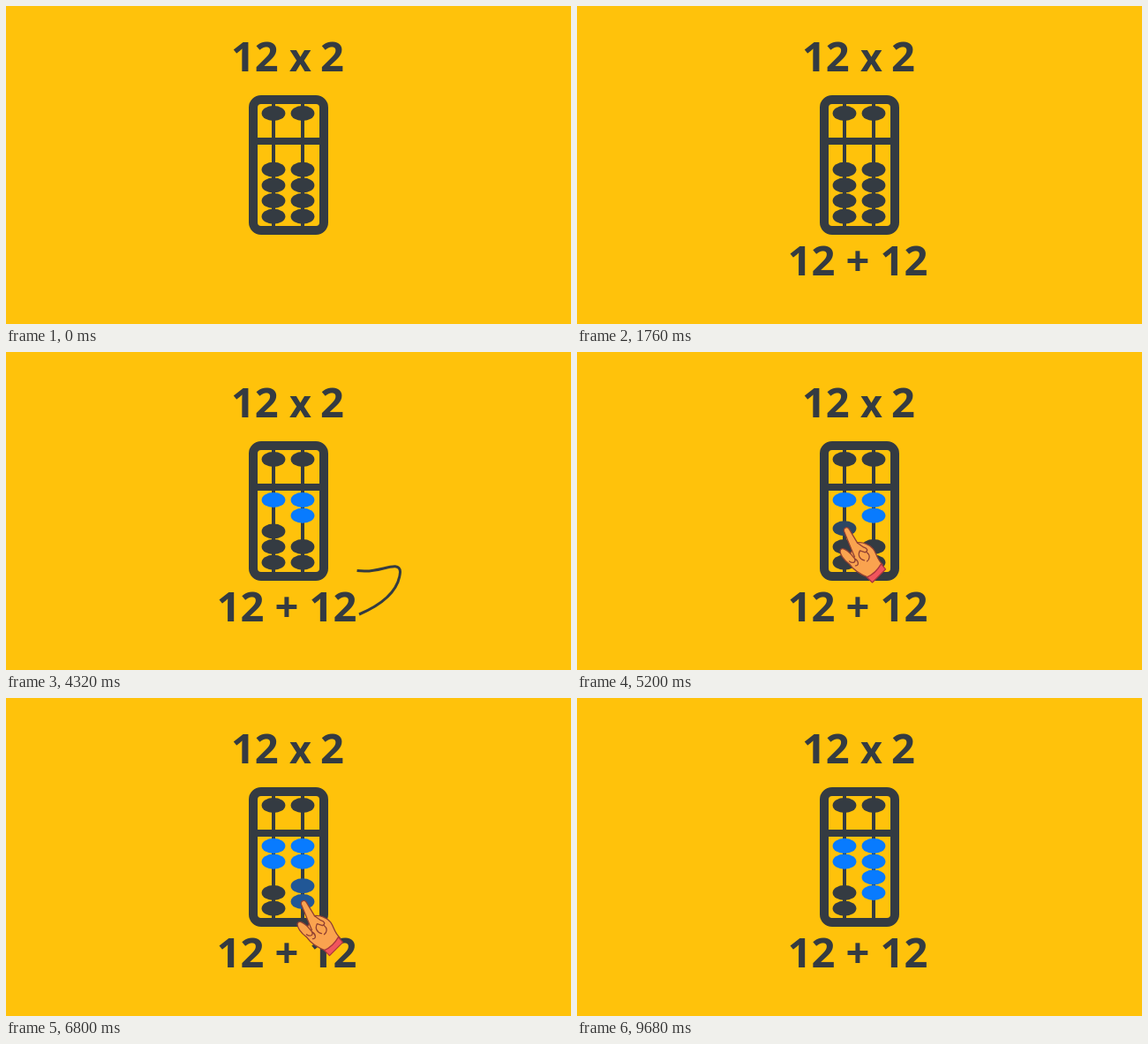
Write an HTML page that moves like this. It is 640 by 360 pixels and loops after 9.76 s.

```html
<!DOCTYPE html>
<html lang="en">
<head>
<meta charset="utf-8">
<title>12 x 2 on an abacus</title>
<style>
  html, body { margin: 0; width: 100%; height: 100%; overflow: hidden; background: #ffc20b; }
  svg { display: block; width: 640px; height: 360px; }
  text { font: bold 47px "Open Sans", "Noto Sans", sans-serif; fill: #343b42; }
  .frame, .trail { fill: none; stroke: #343b42; }
  .trail { stroke-width: 3; }
</style>
</head>
<body>
<svg viewBox="0 0 640 360">
  <defs>
    <g id="hand" stroke="#8f3f32" stroke-width="1.3" stroke-linejoin="round" stroke-linecap="round">
      <path fill="#faa34f" d="M-1 3C-2-1 3-3 5 1L14 16C20 15 28 18 32 23C36 28 36 35 43 41L28 56C20 53 11 49 5 40C-1 36-7 28-5 24C-3 21 2 24 6 28L8 25Z"/>
      <path fill="none" d="M8 25L11 32M14 16L21 21C25 22 27 25 23 27L17 25C14 30 17 35 22 36M6 28L11 34C13 38 9 40 5 37M11 34C16 37 16 42 12 42M25 27C29 30 28 35 25 37"/>
      <path fill="#f1555d" stroke="#a9363d" d="M41 40L46 46L31 61L25 55C32 52 37 47 41 40Z"/>
    </g>
  </defs>
  <text y="74"><tspan x="255">12</tspan><tspan x="321" font-size="45" style="font-size:43px">x</tspan><tspan x="356">2</tspan></text>
  <g class="frame">
    <rect x="280" y="106" width="80" height="148" rx="9" stroke-width="10"/>
    <path stroke-width="8" d="M280 153H360"/>
    <path stroke-width="4" d="M303 108V252M336 108V252"/>
  </g>
  <g id="beads"></g>
  <path class="trail" pathLength="1" d="M239 297C200 292 180 256 195 242C207 231 223 222 230 204C236 187 257 189 278 195"/>
  <path class="trail" pathLength="1" d="M400 297C428 285 445 270 446.500 249C446 235 425 249 406 248C392 248 378 244 366 237"/>
  <text id="sum" x="238.700" y="305">12 + 12</text>
  <g id="hands"></g>
</svg>
<script>
const LOOP = 9760, STEP = 17.7, DARK = [52, 59, 66], BLUE = [8, 123, 255];
const $ = id => document.getElementById(id);
const clamp = v => Math.min(1, Math.max(0, v));
const span = (t, from, to) => clamp((t - from) / (to - from));
const smooth = v => v * v * (3 - 2 * v);
const easeOut = v => 1 - (1 - v) ** 3;
const mix = (a, b, p) => a + (b - a) * p;

function add(parent, tag, attrs) {
  const el = document.createElementNS("http://www.w3.org/2000/svg", tag);
  for (const key in attrs) el.setAttribute(key, attrs[key]);
  return parent.appendChild(el);
}

// Each push: fade in, start and end of the move, fade out
const pushes = [
  { show: 2900, start: 3120, end: 3600, hide: 3640, gone: 3960 },
  { show: 4840, start: 5050, end: 5620, hide: 5720, gone: 5980 },
  { show: 6380, start: 6570, end: 7070, hide: 7090, gone: 7350 }
];
const columns = [
  { x: 303, pushedBy: [0, 1] },
  { x: 336, pushedBy: [0, 0, 2, 2] }
];
const beads = [];
for (const { x, pushedBy } of columns) {
  const bead = cy => add($("beads"), "ellipse", { cx: x, cy, rx: 13.4, ry: 8.5, fill: `rgb(${DARK})` });
  bead(121.5);
  for (let i = 0; i < 4; i++) {
    const y = 185.2 + STEP * i;
    beads.push({ el: bead(y), y, push: pushes[pushedBy[i]] });
  }
}

const hands = [[336, 201, 0], [303.5, 183, 0], [303.5, 203, 1], [335.5, 238.5, 2]].map(([x, y, n]) =>
  ({ el: add($("hands"), "use", { href: "#hand" }), x, y, push: pushes[n] }));

const trailTimes = [[2540, 2960, 3020, 3540], [4160, 4560, 4680, 5080]];
const trails = [...document.querySelectorAll(".trail")];

function drawSum(t) {
  const p = easeOut(span(t, 1200, 1760));
  const scale = mix(2.1, 1, p), x = mix(310, 318, p), y = mix(272, 288.5, p);
  $("sum").setAttribute("transform", `translate(${x} ${y}) scale(${scale}) translate(-318 -288.5)`);
  $("sum").setAttribute("opacity", span(t, 1210, 1440));
}

function draw(t) {
  drawSum(t);
  const progress = push => smooth(span(t, push.start, push.end));
  for (const { el, y, push } of beads) {
    if (!push) continue;
    const p = progress(push);
    el.setAttribute("cy", y - STEP * p);
    el.setAttribute("fill", `rgb(${DARK.map((c, i) => Math.round(mix(c, BLUE[i], p)))})`);
  }
  for (const { el, x, y, push } of hands) {
    el.setAttribute("transform", `translate(${x} ${y - STEP * progress(push)})`);
    el.setAttribute("opacity", span(t, push.show, push.show + 200) * (1 - span(t, push.hide, push.gone)));
  }
  trails.forEach((el, i) => {
    const [start, drawn, erase, gone] = trailTimes[i];
    const head = easeOut(span(t, start, drawn)), tail = smooth(span(t, erase, gone));
    el.setAttribute("visibility", head > tail ? "visible" : "hidden");
    el.setAttribute("stroke-dasharray", `0 ${tail} ${head - tail} 2`);
  });
}

function tick() {
  draw(performance.now() % LOOP);
  requestAnimationFrame(tick);
}
tick();
</script>
</body>
</html>
```
